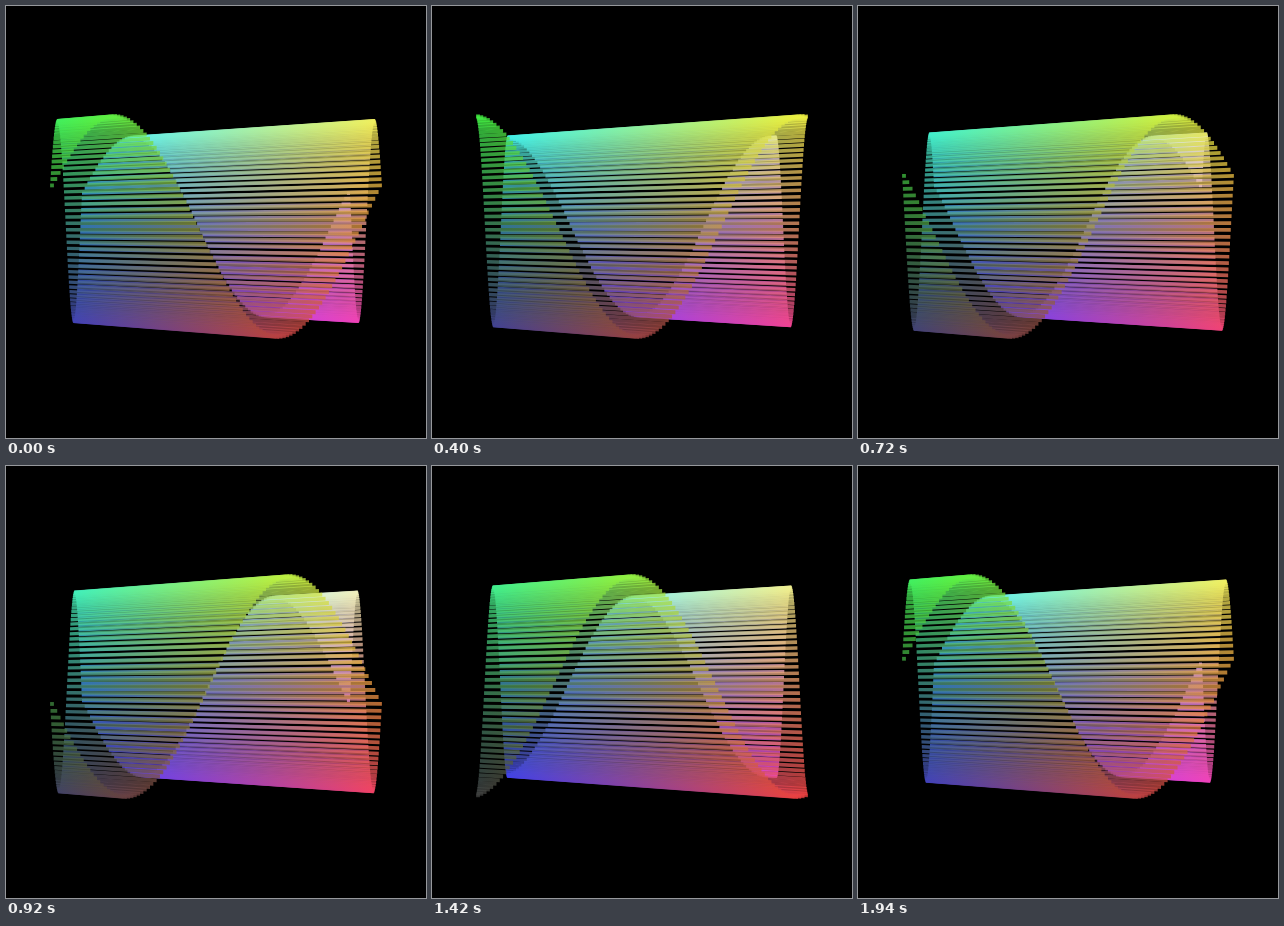
These frames come from a looping animation (420 by 432 pixels, 1960 ms). An HTML page with a canvas:

```html
<!DOCTYPE html>
<html lang="en">
<head>
<meta charset="utf-8">
<title>Colour wave</title>
<style>
html, body { margin: 0; width: 100%; height: 100%; overflow: hidden; background: #000; }
canvas { display: block; }
</style>
</head>
<body>
<canvas id="stage" width="420" height="432"></canvas>
<script>
const ctx = document.getElementById('stage').getContext('2d');
const W = 420, H = 432, CX = 210, CY = 220.5;
const STEPS = 99;           // grid intervals along width and depth
const HALF = 164, AMP = 110.5;
const DEPTH = 0.238;        // depth of the box relative to the camera distance
const DOT = 1.9;            // half thickness of a row at the front
const LOOP = 1960, TICK = 20, START = 6;

const scaleAt = z => 1 / (1 + DEPTH * z);
const level = v => Math.round(65 + 175 * v);
const colour = (x, y, z) => `rgb(${level(x)},${level((y + 1) / 2)},${level(z)})`;

function project(x, y, z) {
  const k = scaleAt(z);
  return { x: CX + (2 * x - 1) * HALF * k, y: CY - y * AMP * k, r: DOT * k };
}

// A row joins all grid points of equal phase: width index + depth index = sum.
function drawRow(sum, shift) {
  const y = Math.sin((sum + shift) * 2 * Math.PI / STEPS);
  const lo = Math.max(0, sum - STEPS) / STEPS;
  const hi = Math.min(STEPS, sum) / STEPS;
  const zl = sum / STEPS - lo, zr = sum / STEPS - hi;
  const a = project(lo, y, zl), b = project(hi, y, zr);
  const left = a.x - a.r, right = b.x + b.r;

  const fill = ctx.createLinearGradient(left, 0, right, 0);
  fill.addColorStop(0, colour(lo, y, zl));
  fill.addColorStop(1, colour(hi, y, zr));
  ctx.fillStyle = fill;
  ctx.beginPath();
  ctx.moveTo(left, a.y - a.r);
  ctx.lineTo(right, b.y - b.r);
  ctx.lineTo(right, b.y + b.r);
  ctx.lineTo(left, a.y + a.r);
  ctx.fill();
}

function draw(ms) {
  const shift = START + Math.floor((ms % LOOP) / TICK);
  ctx.globalAlpha = 1;
  ctx.fillStyle = '#000';
  ctx.fillRect(0, 0, W, H);
  ctx.globalAlpha = 0.75;
  for (let sum = 2 * STEPS; sum >= 0; sum--) drawRow(sum, shift);
}

const t0 = performance.now();
function loop() {
  draw(performance.now() - t0);
  requestAnimationFrame(loop);
}
loop();
</script>
</body>
</html>
```
